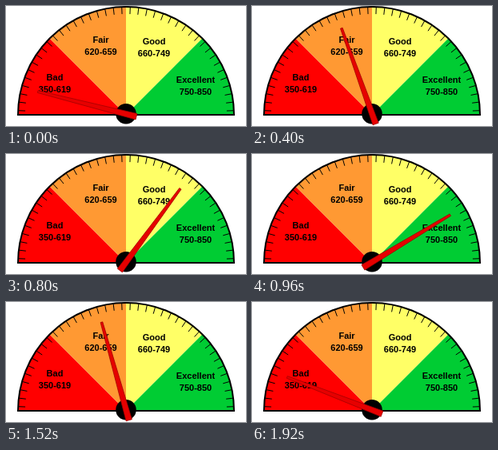
Recreate the animation shown at these times as an HTML page. Size 300 px wide and 150 px high, loop 2000 ms.

```html
<!DOCTYPE html>
<html lang="en">
<head>
<meta charset="utf-8">
<title>Credit score gauge</title>
<style>
  html, body { margin: 0; height: 100%; overflow: hidden; background: #fff; }
  svg { display: block; width: 100%; height: 100%; }
  text { font: bold 11px "Liberation Sans", Arial, sans-serif; text-anchor: middle; }
</style>
</head>
<body>
<svg viewBox="0 0 300 150">
  <g id="dial"></g>
  <path d="M15 136A135 135 0 0 1 285 136Z" fill="none" stroke="#000" stroke-width="2"/>
  <path id="ticks" stroke="#000"/>
  <g id="labels"></g>
  <circle cx="150" cy="134.7" r="12.8"/>
  <path id="needle" d="M-114 -1.4L13.2 -3.8V3.8L-114 1.4Z" fill="#e60000" stroke="#a00000" stroke-width=".7"/>
</svg>
<script>
const $ = id => document.getElementById(id);
const CX = 150, CY = 136, R = 135;

// Point at an angle in degrees, measured clockwise from the left end of the dial
const at = (deg, r) => {
  const a = deg * Math.PI / 180;
  return `${(CX - r * Math.cos(a)).toFixed(2)} ${(CY - r * Math.sin(a)).toFixed(2)}`;
};

const sectors = [
  ['#ff0000', 'Bad', '350-619', 61, 93],
  ['#ff9933', 'Fair', '620-659', 118.5, 46],
  ['#ffff66', 'Good', '660-749', 185, 48],
  ['#00cc33', 'Excellent', '750-850', 237, 96]
];
sectors.forEach(([color, name, range, x, y], i) => {
  $('dial').innerHTML += `<path fill="${color}" d="M${CX} ${CY}L${at(i * 45, R)}A${R} ${R} 0 0 1 ${at(i * 45 + 45, R)}Z"/>`;
  $('labels').innerHTML += `<text x="${x}" y="${y}">${name}</text><text x="${x}" y="${y + 15}">${range}</text>`;
});

const TICK = 4.5;
let ticks = '';
for (let deg = TICK / 2; deg < 180; deg += TICK) ticks += `M${at(deg, R)}L${at(deg, R - 9)}`;
$('ticks').setAttribute('d', ticks);

const STEP = 80, STEPS = 25, PEAK = 12;
const LOW = 14.2, HIGH = 148.9, FALL = 10.65;

function draw() {
  const n = Math.floor(performance.now() / STEP) % STEPS;
  const angle = n <= PEAK ? LOW + (HIGH - LOW) * n / PEAK : HIGH - FALL * (n - PEAK);
  $('needle').setAttribute('transform', `translate(150.2 135) rotate(${angle})`);
  requestAnimationFrame(draw);
}
draw();
</script>
</body>
</html>
```
